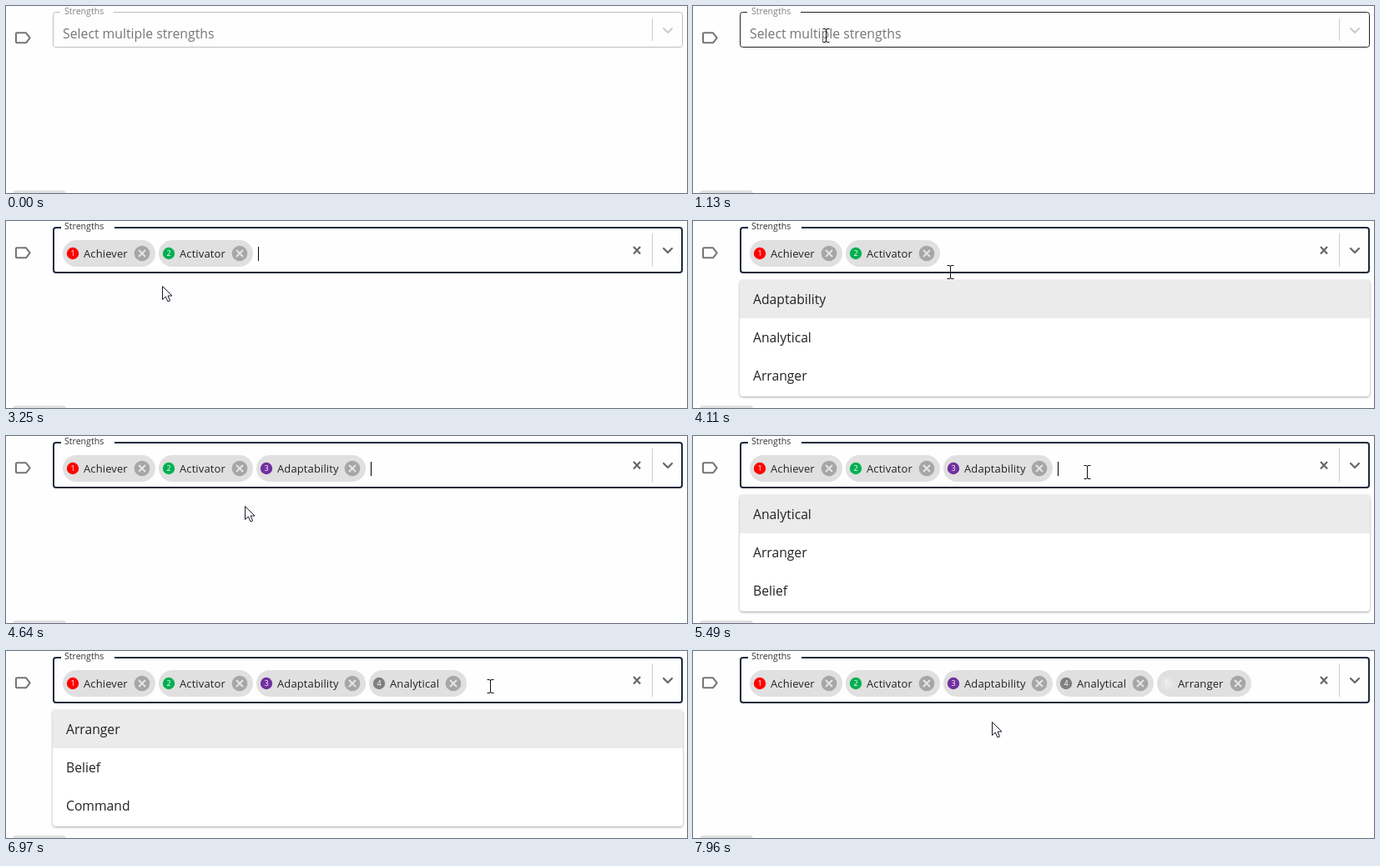
An HTML page that plays this animation: 816x225 px, repeating every 8 s.

```html
<!DOCTYPE html>
<html lang="en">
<head>
<meta charset="utf-8">
<title>Strengths picker</title>
<style>
  html, body { margin: 0; width: 100%; height: 100%; overflow: hidden; background: #fefefe; }
  #stage { display: block; font-family: "Open Sans", sans-serif; }
  .line { fill: none; }
  .badge { font-size: 9px; fill: #fff; text-anchor: middle; }
  .name { font-size: 13px; letter-spacing: .12px; fill: #222; }
  .option { font-size: 15.7px; fill: #222; }
</style>
</head>
<body>
<svg id="stage" width="816" height="225" viewBox="0 0 816 225">
  <rect x="8" y="222" width="64" height="20" rx="4" fill="#e0e0e0"/>
  <path class="line" d="M13 32.3H24L28.7 38.3L24 44.3H13Q12 44.3 12 43.3V33.3Q12 32.3 13 32.3Z" stroke="#757575" stroke-width="2" stroke-linejoin="round"/>
  <rect id="border" class="line" rx="3"/>
  <rect id="notch" y="5" width="64" height="5" fill="#fefefe"/>
  <text id="label" x="70" y="10" font-size="10.6">Strengths</text>
  <text id="placeholder" x="68" y="38.7" font-size="15.8" fill="#757575">Select multiple strengths</text>
  <g id="chips"></g>
  <path id="caret" class="line" stroke="#000"/>
  <path id="clear" class="line" d="M752 31L760 39.4M760 31L752 39.4" stroke="#666" stroke-width="2.2"/>
  <path id="separator" class="line" stroke="#ccc"/>
  <path id="chevron" class="line" d="M788 -2.5L793 2.5L798 -2.5" stroke-width="2.2" stroke-linecap="round" stroke-linejoin="round"/>
  <g id="menu">
    <rect id="paper" x="56" width="755" rx="4" fill="#fff" style="filter:drop-shadow(0 1px 1.5px rgba(0,0,0,.35))"/>
    <svg id="list" x="56" width="755">
      <rect width="755" height="46" fill="#ebebeb"/>
      <g id="options"></g>
    </svg>
  </g>
  <g id="pointer">
    <circle id="glow" cx="-2" cy="-.5" r="12" fill="#ff0" opacity=".5"/>
    <path id="arrow" d="M.5 .5V16.5L4.3 13L7 19L9.6 17.9L7 12H12Z" fill="#fff" stroke="#1a1a2a"/>
    <path id="beam" class="line" d="M-3.5 -7.5H-1Q.5 -7.5 .5 -6Q.5 -7.5 2 -7.5H4.5M.5 -6.5V7M-3.5 8.5H-1Q.5 8.5 .5 7Q.5 8.5 2 8.5H4.5" stroke="#111"/>
    <path id="hand" d="M-1.5 11V1.5Q-1.5 0 0 0Q1.5 0 1.5 1.5V7.5Q4.5 6.5 4.7 8.5Q7.5 7.5 7.8 9.5Q10.5 9 10.5 11V15Q10.5 18 8.5 21.5H0L-4.8 13.5Q-5.2 11 -3.3 11.2L-1.5 13Z" fill="#fff" stroke="#111"/>
  </g>
</svg>
<script>
const LOOP = 8000, ENTER = 210, CLICK = 75, BLINK = 530, ROW = 46;
const names = ["Achiever", "Activator", "Adaptability", "Analytical", "Arranger", "Belief", "Command", "Communication"];
const colors = ["#f00", "#00b050", "#7030a0", "#7f7f7f", "#e7e6e6"];

// Each round clicks the field to open the menu, then picks the first option.
const rounds = [
  { open: 1210, pick: 1900, field: [159, 35], option: [80, 70] },
  { open: 2530, pick: 3160, field: [224, 36], option: [170, 82] },
  { open: 3860, pick: 4560, field: [338, 39], option: [274, 87] },
  { open: 5340, pick: 5950, field: [472, 43], option: [351, 86] },
  { open: 6970, pick: 7570, field: [580, 42], option: [358, 85] }
];

const smooth = u => u * u * (3 - 2 * u);
const easeOut = u => 1 - (1 - u) ** 3;
const moves = rounds.flatMap(({ open, field, option }, i) => [
  i ? { from: rounds[i - 1].pick, until: open - 240, to: field, ease: smooth }
    : { from: ENTER, until: 750, to: field, ease: easeOut },
  { from: open + 170, until: open + 340, to: option, ease: smooth }
]);

const $ = id => document.getElementById(id);
const set = (id, attrs) => { for (const key in attrs) $(id).setAttribute(key, attrs[key]); };
const show = (el, on) => { el.style.display = on ? "" : "none"; };

// Chips are as wide as their names; returns the right edge of each.
function buildChips() {
  $("chips").innerHTML = colors.map((color, i) => `<g>
    <rect y="23" height="32" rx="16" fill="#e0e0e0"/>
    <circle cx="12" cy="39" r="7.2" fill="${color}"/>
    <text class="badge" x="12" y="42.3">${i + 1}</text>
    <text class="name" x="25" y="44">${names[i]}</text>
    <g><circle cy="39" r="9.3" fill="#a6a6a6"/>
    <path d="M-4 35l8 8m0-8l-8 8" stroke="#e6e6e6" stroke-width="1.9"/></g></g>`).join("");
  let x = 68;
  return [...$("chips").children].map(chip => {
    const left = Math.round(x);
    x += chip.querySelector(".name").getComputedTextLength() + 58;
    const right = Math.round(x);
    chip.setAttribute("transform", `translate(${left} 0)`);
    chip.firstElementChild.setAttribute("width", right - left);
    chip.lastElementChild.setAttribute("transform", `translate(${right - left - 16} 0)`);
    x += 4;
    return right;
  });
}

const chipEnds = buildChips();
$("options").innerHTML = [0, 1, 2, 3].map(i => `<text class="option" x="16" y="${28.5 + i * ROW}"></text>`).join("");

function pointerAt(t) {
  return moves.filter(move => t >= move.from).reduce((spot, { from, until, to, ease }) => {
    const part = ease(Math.min(1, (t - from) / (until - from)));
    return spot.map((v, axis) => v + (to[axis] - v) * part);
  }, [570, 205]).map(Math.round);
}

function drawField(focused, hovered, count, bottom, t) {
  const weight = focused ? 2 : 1;
  set("border", {
    x: 56 + weight / 2, y: 7 + weight / 2, width: 755 - weight, height: bottom - 7 - weight,
    stroke: focused ? "#1b2b3b" : hovered ? "#212121" : "#bdbdbd", "stroke-width": weight
  });
  set("notch", { x: focused ? 66 : 65 });
  set("label", { fill: focused ? "#333" : "#808080" });
  set("separator", { d: `M774.5 15V${bottom - 8}` });
  set("chevron", { transform: `translate(0 ${count ? 35.5 : 29.5})`, stroke: focused ? "#666" : "#ccc" });
  show($("placeholder"), !count);
  show($("clear"), count);
  [...$("chips").children].forEach((chip, i) => show(chip, i < count));

  const x = count ? chipEnds[count - 1] + 6.5 : 70.5;
  set("caret", { d: `M${x} ${count ? 31 : 24}v17` });
  show($("caret"), focused && (t - 1070) % (2 * BLINK) < BLINK);
}

function drawMenu(open, count, top) {
  show($("menu"), open);
  const height = 211 - top;
  set("paper", { y: top, height });
  set("list", { y: top, height });
  [...$("options").children].forEach((row, i) => { row.textContent = names[count + i] || ""; });
}

function drawPointer(t, x, y, kind) {
  show($("pointer"), t >= ENTER);
  set("pointer", { transform: `translate(${x} ${y})` });
  for (const id of ["arrow", "beam", "hand"]) show($(id), id === kind);
  const pressed = end => t >= end - CLICK && t < end;
  show($("glow"), rounds.some(({ open, pick }) => pressed(open) || pressed(pick)));
}

function render(t) {
  const count = rounds.filter(({ pick }) => t >= pick).length;
  const open = rounds.some(round => t >= round.open && t < round.pick);
  const bottom = count ? 63 : 50;
  const [x, y] = pointerAt(t);
  const hovered = y < bottom;
  drawField(t >= rounds[0].open, hovered, count, bottom, t);
  drawMenu(open, count, bottom + 8);
  drawPointer(t, x, y, hovered ? "beam" : open ? "hand" : "arrow");
}

const start = performance.now();
(function tick() {
  render((performance.now() - start) % LOOP);
  requestAnimationFrame(tick);
})();
</script>
</body>
</html>
```
